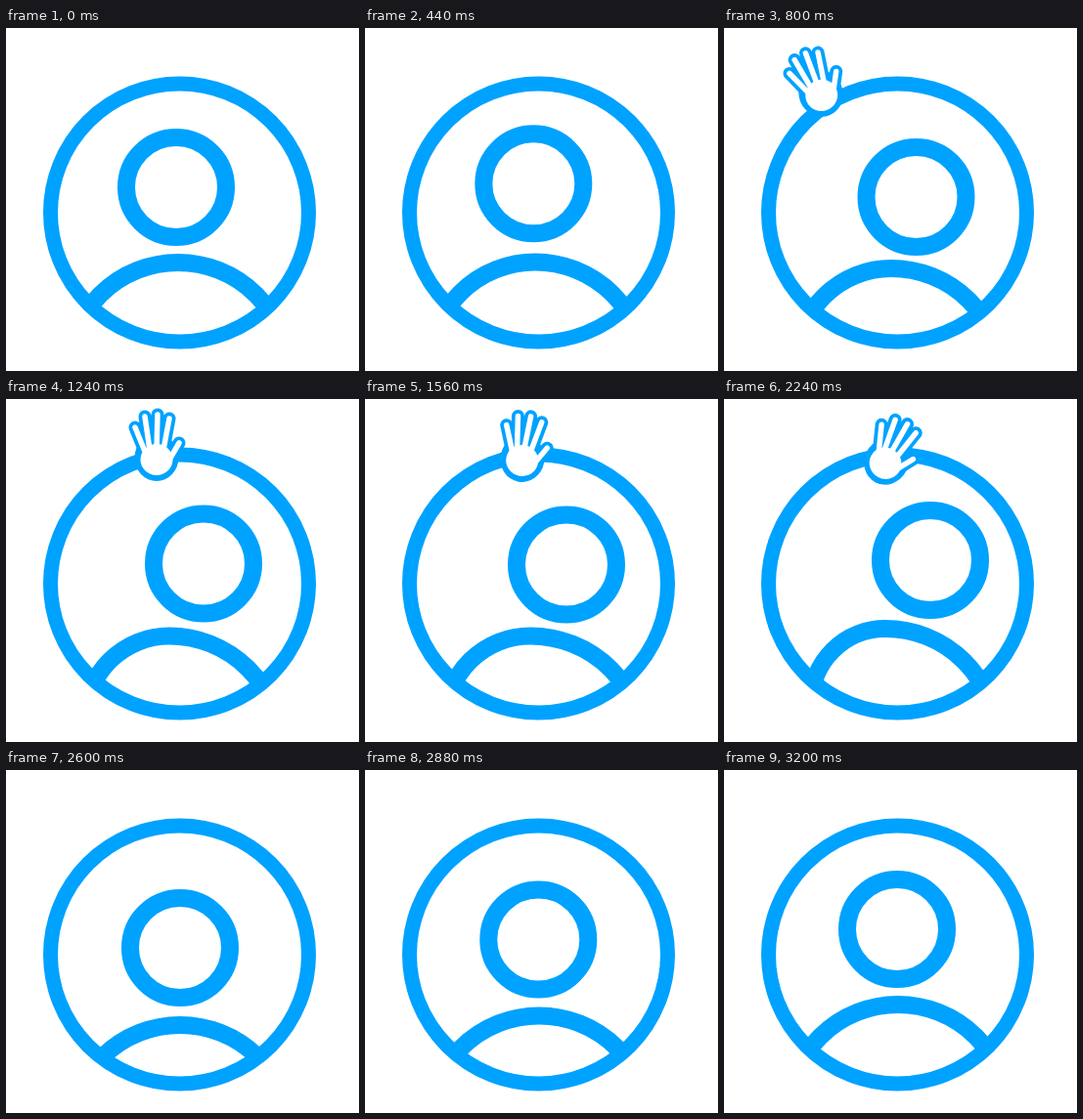
These frames come from a looping animation (361x351 px, 4080 ms). An HTML page:

```html
<!DOCTYPE html>
<html lang="en">
<head>
<meta charset="utf-8">
<title>Waving profile icon</title>
<style>
  html, body { margin: 0; width: 100%; height: 100%; overflow: hidden; background: #fff; }
  svg { display: block; width: 361px; height: 351px; }
  .line { fill: none; stroke: #00a2ff; stroke-linecap: round; }
  .edge { fill: #00a2ff; stroke: #00a2ff; stroke-width: 13; stroke-linecap: round; }
  .skin { fill: #fff; stroke: #fff; stroke-width: 5.5; stroke-linecap: round; }
  .palm { stroke: none; }
</style>
</head>
<body>
<svg viewBox="0 0 361 351">
  <defs>
    <clipPath id="inside"><circle cx="177.5" cy="189" r="133"/></clipPath>
    <path id="fingers" d="M-22-31L-11-4M-12-42L-7-8M1-44L0-8M13-40L7-8M23-15L12 4"/>
  </defs>
  <circle class="line" cx="177.5" cy="189" r="132" stroke-width="15"/>
  <path id="body" class="line" stroke-width="18" clip-path="url(#inside)"/>
  <circle id="head" class="line" r="51" stroke-width="18"/>
  <g id="hand">
    <g class="edge">
      <use href="#fingers"/>
      <ellipse class="palm" rx="22.5" ry="24"/>
    </g>
    <g class="skin">
      <use href="#fingers"/>
      <ellipse class="palm" cy="2" rx="16.5" ry="16"/>
    </g>
  </g>
</svg>
<script>
const LOOP = 4080, STEP = 40;

// time, x, y
const headKeys = [
  [0, 174, 163], [240, 162, 173], [520, 178, 156], [800, 196.5, 173],
  [1240, 202, 168.5], [1560, 206, 169.5], [2240, 211, 165],
  [2600, 178, 182], [3200, 177, 163]
];

// time, apex x, apex y, left radius, right radius
const bodyKeys = [
  [0, 176, 240, 113, 113], [240, 174, 250, 113, 110], [520, 174, 237, 106, 113],
  [800, 171, 246, 97, 113], [1240, 167, 242.5, 86, 114], [1560, 169, 242.5, 87, 117],
  [2240, 165, 235, 76, 114], [2600, 178, 261, 113, 113], [3200, 178, 240, 113, 113]
];

// time, x, y, angle, scale
const handKeys = [
  [520, 66, 122, -66, 0], [640, 53, 125, -62, 1], [800, 99, 67, -22, 1],
  [1020, 140, 58, 4, 1], [1240, 154, 60, 0, 1], [1440, 166, 64, 28, 1],
  [1560, 161, 61, 10, 1], [1640, 154, 60, 0, 1], [1840, 166, 64, 28, 1],
  [2040, 154, 60, 0, 1], [2240, 166, 64, 28, 1], [2360, 163, 54, 10, 1],
  [2540, 158, 74, 0, 0]
];

const $ = id => document.getElementById(id);

function slope(keys, i, c) {
  const a = keys[i - 1], b = keys[i], d = keys[i + 1];
  if (!a || !d) return 0;
  const p = (b[c] - a[c]) / (b[0] - a[0]);
  const q = (d[c] - b[c]) / (d[0] - b[0]);
  return p * q > 0 ? 2 * p * q / (p + q) : 0;
}

// Smooth curve through the keys, turning only at a key
function sample(keys, t) {
  const last = keys.length - 1;
  if (t <= keys[0][0]) return keys[0].slice(1);
  if (t >= keys[last][0]) return keys[last].slice(1);
  const i = keys.findIndex(k => k[0] > t) - 1;
  const a = keys[i], b = keys[i + 1];
  const span = b[0] - a[0], u = (t - a[0]) / span, v = 1 - u;
  return a.slice(1).map((from, j) => {
    const c = j + 1;
    return from * v * v * (1 + 2 * u) + b[c] * u * u * (3 - 2 * u)
      + span * u * v * (slope(keys, i, c) * v - slope(keys, i + 1, c) * u);
  });
}

function draw(t) {
  const [hx, hy] = sample(headKeys, t);
  $("head").setAttribute("cx", hx);
  $("head").setAttribute("cy", hy);

  const [x, y, l, r] = sample(bodyKeys, t);
  $("body").setAttribute("d",
    `M${x - l} ${y + l}A${l} ${l} 0 0 1 ${x} ${y}A${r} ${r} 0 0 1 ${x + r} ${y + r}`);

  const [px, py, angle, size] = sample(handKeys, t);
  $("hand").setAttribute("visibility", size > 0.01 ? "visible" : "hidden");
  $("hand").setAttribute("transform",
    `translate(${px} ${py}) rotate(${angle}) scale(${size})`);
}

const start = performance.now();
function tick() {
  const t = (performance.now() - start) % LOOP;
  draw(Math.floor(t / STEP) * STEP);
  requestAnimationFrame(tick);
}
tick();
</script>
</body>
</html>
```
